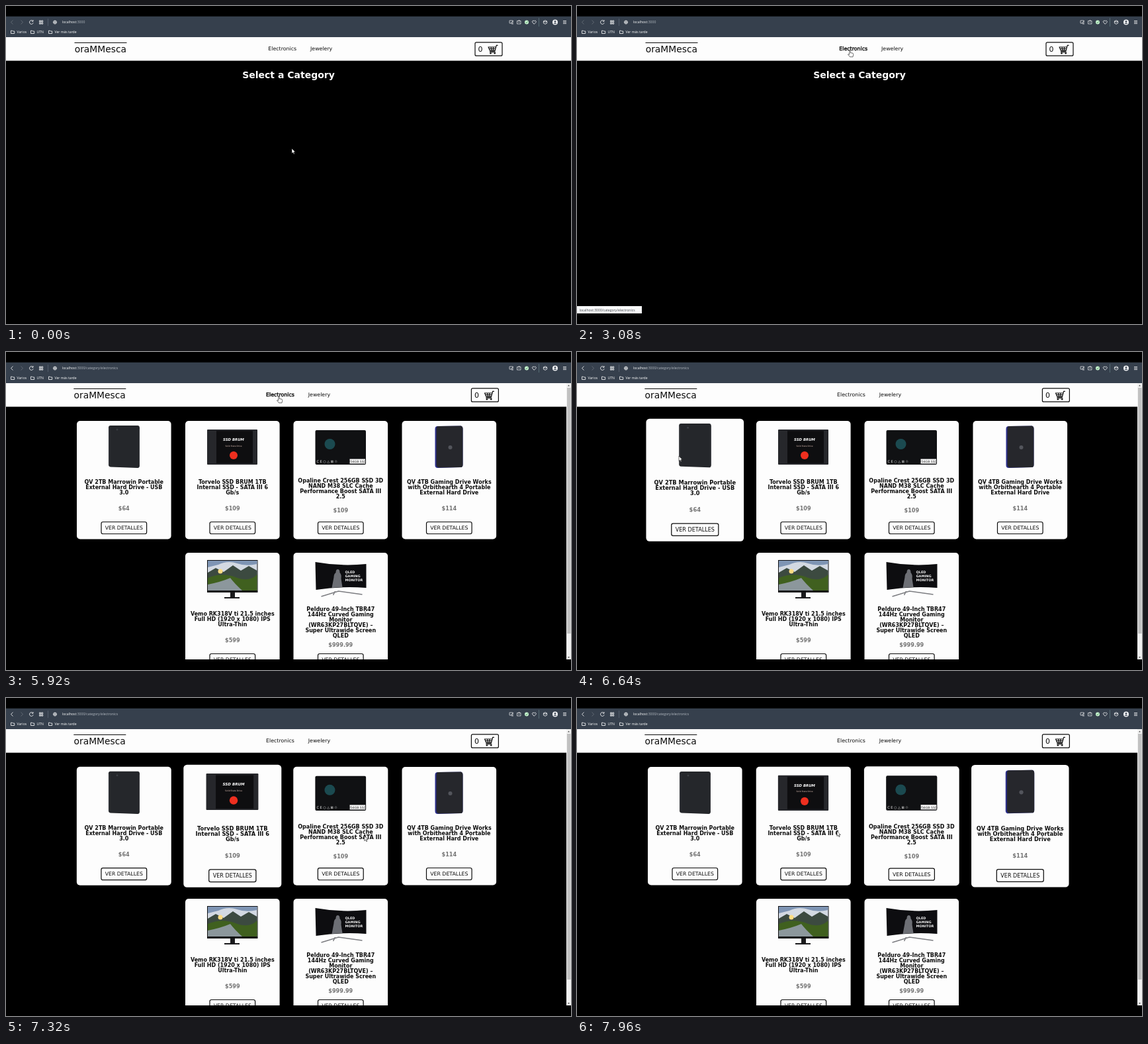
Animation, 854 px wide and 480 px high, one loop 8000 ms. Source, as an HTML page:

```html
<!DOCTYPE html>
<html lang="es">
<head>
<meta charset="utf-8">
<title>Shop catalogue</title>
<style>
html, body { margin: 0; height: 100%; overflow: hidden; background: #000; }
svg { display: block; width: 100vw; height: 100vh; font-family: "DejaVu Sans", Verdana, sans-serif; }
.ui { font-family: "Open Sans", sans-serif; }
.mid { text-anchor: middle; }
.bold { font-weight: bold; }
.icon { fill: none; stroke: #fff; stroke-width: .8; }
.ink { fill: none; stroke: #0c0c0c; stroke-width: 1.2; }
</style>
</head>
<body>
<svg id="stage" viewBox="0 0 854 480"></svg>
<script>
const INK = '#0c0c0c', LIGHT = '#fff', PAPER = '#fdfdfd', LOOP = 8000;

const text = (x, y, size, str, more = '') => `<text x="${x}" y="${y}" font-size="${size}" ${more}>${str}</text>`;
const rect = (x, y, w, h, fill, more = '') => `<rect x="${x}" y="${y}" width="${w}" height="${h}" fill="${fill}" ${more}/>`;
const path = (d, more = '') => `<path d="${d}" ${more}/>`;
const dot = (x, y, r, fill) => `<circle cx="${x}" cy="${y}" r="${r}" fill="${fill}"/>`;

const portableDrive =
  path('M51 7H92Q95 7 95 11V67Q95 71 92 71L51 69.500Q48 69 48 66V10Q48 7 51 7Z', 'fill="#25272b"') +
  path('M49 11V66M94.300 12V67', 'stroke="#44464b" stroke-width=".7"') + dot(61, 13, 1.5, '#3a3d42');

const redDrive =
  rect(33, 13, 76, 53, '#26272b', 'rx="1"') + rect(47, 15, 55, 49, '#0e0e10') +
  text(73, 30, 5.4, 'SSD BRUM', 'class="mid bold" fill="#fff" font-style="italic"') +
  text(73, 38.5, 3, 'Solid State Drive', 'class="mid" fill="#e8c8bc"') +
  dot(73, 52, 6, '#ee2f1f');

const tealDrive =
  rect(33, 14, 76.5, 52, '#101113', 'rx="2"') + dot(55, 35, 8, '#1b4a50') +
  text(35, 63, 5, 'C E ○ △ ⊠ ♲', 'fill="#f2f2f2"') +
  rect(85, 57.5, 23.5, 7, PAPER) + text(96.5, 63, 4.6, '256GB SSD', 'class="mid" fill="#222"');

const gamingDrive =
  path('M54 8L89 7.500Q92 8 92 12V66Q92 70 89 70L54 71Q50 71 50 67V12Q50 8 54 8Z', 'fill="#2c2f8c"') +
  path('M55 8L89 7.500Q92 8 92 12V66Q92 70 89 70L56 70.500Q52 70 52 66V12Q52 8 55 8Z', 'fill="#26272c"') +
  dot(73, 40, 3, '#53555c');

const flatMonitor =
  rect(33, 11, 76.5, 49, '#101012') + rect(34, 12, 74.5, 45, '#d3d9e2') +
  path('M34 12H108.500V17Q92 21 78 16T50 18L34 22Z', 'fill="#7f95b4"') +
  path('M34 30L46 23 58 29 72 19 84 27 96 20 108.500 27V57H34Z', 'fill="#3c4a40"') +
  path('M34 38Q55 29 76 37T108.500 33V57H34Z', 'fill="#40601f"') +
  path('M34 57V48Q54 44 68 38Q74 46 86 57Z', 'fill="#8c979c"') + dot(53, 28, 3.5, '#ffdc82') +
  path('M68 60H75V67H82V69H59V67H68Z', 'fill="#1a1a1c"');

const curvedMonitor =
  path('M42 66L68 58 104 63M63 58L60 64', 'fill="none" stroke="#7b7c80" stroke-width="1.500"') +
  path('M33 14Q72 21 110 17V53Q72 50 34 56Z', 'fill="#0d0d10"') +
  path('M58 53L61 37Q61 32 64 30Q64 25 67 25T70 30Q73 33 72 39L74 52Z', 'fill="#6d6f75"') +
  ['QLED', 'GAMING', 'MONITOR'].map((s, i) =>
    text(78, 31 + i * 6, 5, s, 'class="bold" fill="#f0f0f0"')).join('');

// grow: [time, amount] pairs for the hover zoom
const products = [
  { x: 107, y: 104, art: portableDrive, price: '$64', grow: [[6530, 0], [6900, 1], [6960, 1], [7400, 0]],
    title: ['QV 2TB Marrowin Portable', 'External Hard Drive - USB', '3.0'] },
  { x: 271, y: 104, art: redDrive, price: '$109', grow: [[7040, 0], [7250, .85], [7600, 0], [7945, 0], [8000, .1]],
    title: ['Torvelo SSD BRUM 1TB', 'Internal SSD - SATA III 6', 'Gb/s'] },
  { x: 434.5, y: 104, art: tealDrive, price: '$109',
    grow: [[7315, 0], [7440, .5], [7760, 0], [7830, 0], [7900, .25], [8100, 0]],
    title: ['Opaline Crest 256GB SSD 3D', 'NAND M38 SLC Cache', 'Performance Boost SATA III', '2.5'] },
  { x: 598.5, y: 104, art: gamingDrive, price: '$114', grow: [[7450, 0], [7800, 1], [7850, 1], [8220, 0]],
    title: ['QV 4TB Gaming Drive Works', 'with Orbithearth 4 Portable', 'External Hard Drive'] },
  { x: 271, y: 303, art: flatMonitor, price: '$599', grow: [[0, 0]],
    title: ['Vemo RK318V ti 21.5 inches', 'Full HD (1920 x 1080) IPS', 'Ultra-Thin'] },
  { x: 434.5, y: 303, art: curvedMonitor, price: '$999.99', grow: [[0, 0]],
    title: ['Pelduro 49-Inch TBR47', '144Hz Curved Gaming', 'Monitor', '(WR63KP27BLTQVE) –', 'Super Ultrawide Screen', 'QLED'] },
];

const card = ({ x, y, art, title, price }) => {
  const extra = title.length - 3;
  return `<g transform="translate(${x} ${y})"><g class="card">` +
    rect(0, 0, 142.6, 178.5, PAPER, 'rx="5"') + art +
    title.map((s, i) => text(71.3, 95.3 - extra * 2.6 + i * 8, 8, s, `class="mid bold" fill="${INK}"`)).join('') +
    text(71.3, 135.3 + extra * 2.3, 8.1, price, 'class="mid bold" fill="#747474"') +
    rect(37, 152.5, 68.6, 18, 'none', `rx="2.500" stroke="${INK}" stroke-width="1.200"`) +
    text(71.3, 164, 7.8, 'VER DETALLES', `class="mid" fill="${INK}"`) + '</g></g>';
};

const folder = (x, name) =>
  path(`M${x} 37.200h2l.8 .8h2.400v3.500h-5.200Z`, 'class="icon" stroke-width=".6"') +
  text(x + 9, 41.2, 5.1, name, `class="ui" fill="${LIGHT}"`);

const browserBar =
  rect(0, 15.7, 854, 32, '#36404d') +
  path('M10.500 21.500L7.500 24.500 10.500 27.500', 'id="back" class="icon"') +
  path('M22.500 21.500L25.500 24.500 22.500 27.500', 'class="icon" opacity=".25"') +
  path('M40.500 22.500A2.900 2.900 0 1 0 41.200 25.300M41 21V23.200H38.800', 'class="icon"') +
  path('M50.500 22h2v2h-2ZM53.700 22h2v2h-2ZM50.500 25.200h2v2h-2ZM53.700 25.200h2v2h-2Z', 'class="icon"') +
  path('M63.500 19V30', 'stroke="#525d6b"') +
  path('M71.500 24.500a2.500 2.500 0 1 0 5 0a2.500 2.500 0 1 0-5 0M71.500 24.500h5M74 22V27', 'class="icon"') +
  text(85, 26.3, 5.1, `localhost<tspan fill="#b4bac2">:3000<tspan id="route">/category/electronics</tspan></tspan>`,
    `class="ui" fill="${LIGHT}"`) +
  folder(7.5, 'Varios') + folder(37.5, 'UTN') + folder(64.5, 'Ver más tarde') +
  path('M761 22h5v4h-5ZM763 26L767 22M764 27h3', 'class="icon" opacity=".8"') +
  path('M772.500 22.500h5.500v4.500h-5.500ZM774 22.500l1-1h1l1 1M774.300 24.700h2', 'class="icon" opacity=".8"') +
  dot(787, 24.5, 3, '#c8f5d0') + path('M785.500 24.500l1.200 1.200 1.900-2.300', 'fill="none" stroke="#2c6a40" stroke-width=".8"') +
  path('M798.300 27.300l-2.600-2.600a1.500 1.500 0 0 1 2.600-1.900a1.500 1.500 0 0 1 2.600 1.900Z', 'class="icon"') +
  path('M805.500 18V31', 'stroke="#566a72"') +
  path('M815 21.700l2.600 1.300v3l-2.600 1.300-2.600-1.300v-3ZM812.400 23l2.600 1.300 2.600-1.300', 'class="icon"') +
  dot(830, 24.5, 4, '#f2f3f5') + dot(830, 23.4, 1.4, '#4a5360') + path('M827.500 27Q830 23.500 832.500 27Z', 'fill="#4a5360"') +
  path('M842 22.500h5M842 24.500h5M842 26.500h5', 'class="icon"');

const header =
  rect(0, 47, 854, 35.6, PAPER) +
  `<g class="shift" data-dx="-1.200">${path('M103.500 55.500H182.500', 'class="ink"')}` +
  text(103.7, 70, 13.85, 'oraMMesca', `fill="${INK}"`) + '</g>' +
  `<g class="shift" data-dx="-3.200" fill="${INK}">` +
  text(396.3, 67.3, 7.85, 'Electronics', `id="link" stroke="${INK}"`) + text(460, 67.3, 7.85, 'Jewelery') + '</g>' +
  '<g class="shift" data-dx="-5.600">' + rect(709, 54.8, 41, 20.4, 'none', 'class="ink" rx="2"') +
  text(713.5, 69.2, 11, '0', `fill="${INK}"`) +
  path('M743.500 59.300H741.300L738.800 68.300H731M740.500 62H729.200L731.200 67H739M730.500 64.500H739.500M733 62L734 67M736.500 62V67M731 70H740',
    'class="ink" stroke-width="1.100"') + dot(732.5, 71.3, 1.2, INK) + dot(738.8, 71.3, 1.2, INK) + '</g>';

const catalog = products.map(card).join('') +
  rect(847, 47, 7, 417, '#f1f1f1') + rect(848, 54, 5.5, 371, '#c1c1c1') +
  path('M849 51.500L850.500 49.500 852 51.500ZM849 460L850.500 462 852 460Z', 'fill="#505050"');

const status = rect(0, 453, 98, 11, '#f8f9fa') +
  text(3.5, 460.5, 5.1, 'localhost:3000/category/electronics', 'class="ui" fill="#45484d"');

const outline = 'fill="#fff" stroke="#0c0c0c" stroke-width=".6" stroke-linejoin="round"';

const stage = document.getElementById('stage');
stage.innerHTML = rect(0, 0, 854, 480, '#000') + browserBar + header +
  text(427, 109, 14, 'Select a Category', `id="prompt" class="mid bold" fill="${LIGHT}"`) +
  `<g id="catalog">${catalog}</g>` + rect(0, 464, 854, 16, '#000') + `<g id="status">${status}</g>` +
  '<g id="cursor">' + path('M0 0V7.600L1.800 6 3 8.700 4.200 8.200 3.100 5.500H5.300Z', `id="arrow" ${outline}`) +
  path('M-.700 .500Q0-.500 .700 .500V3.500L4.500 4.300Q5.500 4.800 5.200 6.500L4.500 9.800H0L-3 6Q-2.500 5-.700 6.200Z', `id="hand" ${outline}`) + '</g>';

const $ = id => document.getElementById(id);
const cards = [...document.querySelectorAll('.card')];
const shifted = [...document.querySelectorAll('.shift')];
const show = (id, on) => $(id).style.display = on ? '' : 'none';
const easeOut = u => 1 - (1 - u) ** 2;
const linear = u => u;

// Value of a list of [time, value] keys at time t
function track(keys, t, ease = linear, k = 1) {
  const i = keys.findIndex(key => key[0] > t);
  if (i === 0) return keys[0][k];
  if (i < 0) return keys[keys.length - 1][k];
  const a = keys[i - 1], b = keys[i];
  return a[k] + (b[k] - a[k]) * ease((t - a[0]) / (b[0] - a[0]));
}

const pointer = [
  [1400, 432, 215], [1600, 438, 190], [1900, 431, 130], [2160, 422, 86], [2280, 418, 73], [2560, 412.5, 67],
  [6080, 412.5, 67], [6240, 370, 84], [6440, 230, 130], [6640, 154, 157], [6860, 150, 172], [6980, 235, 185],
  [7200, 360, 200], [7320, 541, 208], [7480, 650, 203], [7680, 680, 198], [7800, 625, 198], [7880, 520, 200], [7960, 393, 201],
];
const hover = [[2240, 0], [2440, .38], [6120, .38], [6240, 0]];

function draw(t) {
  const routed = t >= 3360, loaded = t >= 5040, pointing = t >= 2280 && t < 6130;
  show('prompt', !routed);
  show('route', routed);
  show('catalog', loaded);
  show('arrow', !pointing);
  show('hand', pointing);
  $('back').setAttribute('opacity', routed ? 1 : .25);
  $('status').setAttribute('opacity', track([[2260, 0], [2400, 1], [3360, 1], [3560, 0]], t));
  $('link').setAttribute('stroke-width', track(hover, t));
  for (const el of shifted) el.setAttribute('transform', `translate(${loaded ? el.dataset.dx : 0})`);
  cards.forEach((el, i) => {
    const scale = 1 + .07 * track(products[i].grow, t, easeOut);
    el.setAttribute('transform', `translate(71.3 89.25) scale(${scale}) translate(-71.3 -89.25)`);
  });
  $('cursor').setAttribute('transform', `translate(${track(pointer, t)} ${track(pointer, t, linear, 2)})`);
}

function tick() {
  draw(performance.now() % LOOP);
  requestAnimationFrame(tick);
}
tick();
</script>
</body>
</html>
```
